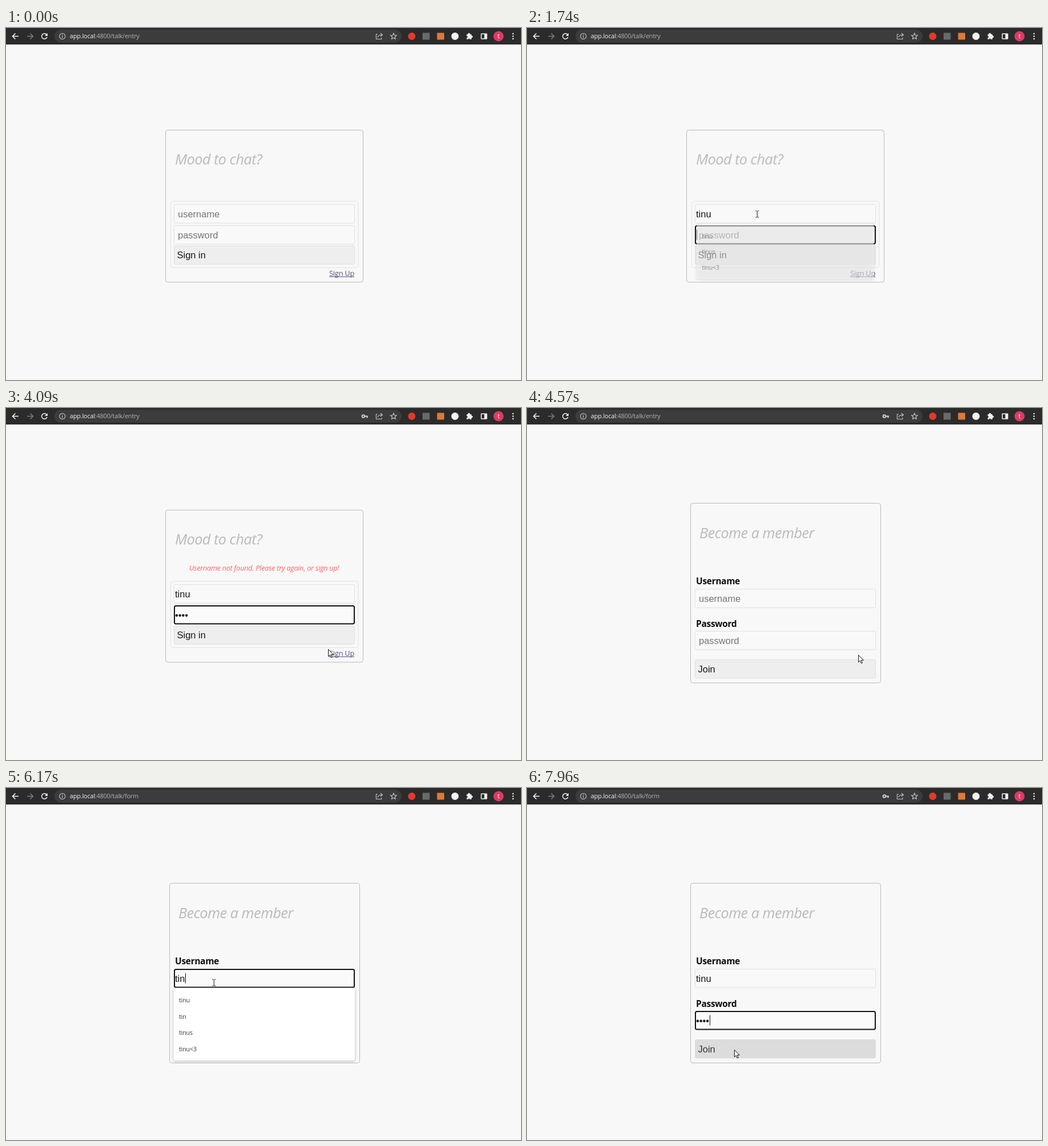
An HTML page with a canvas for the animation above (8 s loop, 905 by 619 pixels).

```html
<!DOCTYPE html>
<html lang="en">
<head>
<meta charset="utf-8">
<title>Sign in and join</title>
<style>
  html, body { margin: 0; width: 100%; height: 100%; overflow: hidden; background: #f8f8f8; }
  canvas { display: block; }
</style>
</head>
<body>
<canvas id="stage" width="905" height="619"></canvas>
<script>
const ctx = document.getElementById('stage').getContext('2d');
const LOOP = 8000;
const BLINK = 530;
const TAU = Math.PI * 2;
const UI = '"Open Sans", "Noto Sans", sans-serif';
const FORM = '"Liberation Sans", Arial, sans-serif';
const NAME = 'tinu';
const SUGGESTIONS = ['tinu', 'tin', 'tinus', 'tinu<3', 'moreb', 'kelso4'];

const PAGES = {
  login: {
    start: 0, card: [280.5, 179.5, 347, 267.5], title: ['Mood to chat?', 297, 240],
    fields: [310.5, 347.5], button: ['Sign in', 383],
    focus: 530, typed: [1270, 1370, 1430, 1470], tab: 1670, dots: [1980, 2060, 2130, 2210]
  },
  join: {
    start: 4360, card: [287.5, 167.5, 334, 316], title: ['Become a member', 303, 229],
    fields: [318.5, 392.5], button: ['Join', 442.5],
    focus: 5120, typed: [5980, 6050, 6170, 6240], tab: 6450, dots: [6610, 6700, 6780, 6860]
  }
};

// Pointer legs: start, end, from, to
const LEGS = [
  [40, 500, 805, 572, 403.5, 327],
  [3790, 4160, 403.5, 327, 582, 434],
  [4660, 5100, 582, 434, 364.5, 342],
  [7510, 7910, 364.5, 342, 364, 460]
];

const clamp = v => Math.max(0, Math.min(1, v));
const progress = (t, from, to) => clamp((t - from) / (to - from));
const ease = p => p * p * (3 - 2 * p);
const countBefore = (times, t) => times.filter(at => at <= t).length;

function text(str, x, y, size, color, { family = UI, style = '', align = 'left' } = {}) {
  ctx.font = `${style} ${size}px ${family}`;
  ctx.letterSpacing = family === UI ? `${-0.019 * size}px` : '0px';
  ctx.textAlign = align;
  ctx.fillStyle = color;
  ctx.fillText(str, x, y);
  return ctx.measureText(str).width;
}

function box(x, y, w, h, r, fill, stroke, line = 1) {
  ctx.beginPath();
  ctx.roundRect(x, y, w, h, r);
  if (fill) { ctx.fillStyle = fill; ctx.fill(); }
  if (stroke) { ctx.strokeStyle = stroke; ctx.lineWidth = line; ctx.stroke(); }
}

function disc(x, y, r, color) {
  ctx.beginPath();
  ctx.arc(x, y, r, 0, TAU);
  ctx.fillStyle = color;
  ctx.fill();
}

function ring(x, y, r, color, line, from = 0, to = TAU) {
  ctx.beginPath();
  ctx.arc(x, y, r, from, to);
  ctx.strokeStyle = color;
  ctx.lineWidth = line;
  ctx.stroke();
}

function stroke(d, color, line) {
  ctx.strokeStyle = color;
  ctx.lineWidth = line;
  ctx.stroke(new Path2D(d));
}

function shape(d, x, y, fill, outline) {
  const path = new Path2D(d);
  ctx.save();
  ctx.translate(x, y);
  ctx.fillStyle = fill;
  ctx.fill(path);
  ctx.strokeStyle = outline;
  ctx.lineWidth = 1;
  ctx.lineJoin = 'round';
  ctx.stroke(path);
  ctx.restore();
}

function drawStar(x, y) {
  ctx.beginPath();
  for (let i = 0; i < 10; i++) {
    const a = -Math.PI / 2 + i * Math.PI / 5;
    const r = i % 2 ? 2.5 : 5.6;
    ctx.lineTo(x + r * Math.cos(a), y + r * Math.sin(a));
  }
  ctx.closePath();
  ctx.strokeStyle = '#d0d0d0';
  ctx.lineWidth = 1.1;
  ctx.stroke();
}

function drawToolbar(t) {
  ctx.fillStyle = '#2b2b2b';
  ctx.fillRect(0, 0, 905, 29);
  box(85, 3, 610, 22.5, 11, '#3c3c3c');

  stroke('M22 14.5H11.5M16.5 9.5L11.5 14.5L16.5 19.5', '#f2f2f2', 1.6);
  stroke('M37 14.5H47.5M42.5 9.5L47.5 14.5L42.5 19.5', '#7d7d7d', 1.5);
  ring(67.5, 14.5, 4.7, '#f2f2f2', 1.6, 0.3, TAU - 0.7);
  ctx.fillStyle = '#f2f2f2';
  ctx.fill(new Path2D('M73 9V14H68Z'));

  ring(99, 14.5, 5, '#c8c8c8', 1.1);
  stroke('M99 13.5V17.5M99 11.3V12.5', '#c8c8c8', 1.2);
  const hostWidth = text('app.local', 112, 18, 11, '#f4f4f4');
  text(':4800/talk/' + (t < 4640 ? 'entry' : 'form'), 112 + hostWidth, 18, 11, '#b2b2b2');

  const keyShown = (t >= 1980 && t < 5980) || t >= 6610;
  if (keyShown) {
    ring(628, 14.5, 2.3, '#d0d0d0', 2);
    stroke('M630.5 14.5H636M634.5 14.5V17.5', '#d0d0d0', 2);
  }
  stroke('M653 11H650.5V19.5H660V17M653 16.5C653.5 13 656 12 661 12M658 9L661.5 12L658 15', '#c4c4c4', 1.1);
  drawStar(681, 14.8);

  disc(713, 14.5, 6.5, '#e23a2e');
  box(732, 8.5, 12.5, 12, 0, '#6a6a6a');
  box(757.5, 8.5, 12.5, 12, 1, '#dc7a3a');
  disc(789, 14.5, 6.5, '#f4f4f4');

  box(809.5, 11, 8.5, 9, 1, '#f2f2f2');
  disc(813.5, 10.7, 1.9, '#f2f2f2');
  disc(818.3, 15.3, 1.9, '#f2f2f2');
  disc(809.7, 15.6, 1.5, '#2b2b2b');
  disc(813.6, 20, 1.5, '#2b2b2b');

  box(835.2, 10.2, 9.6, 8.8, 0.5, null, '#f2f2f2', 1.5);
  ctx.fillStyle = '#f2f2f2';
  ctx.fillRect(840.5, 10, 4.5, 9);
  disc(865.5, 14.5, 9, '#dc3b66');
  text('t', 865.5, 18, 10.5, '#fff', { align: 'center' });
  for (const y of [10, 14.5, 19]) disc(891, y, 1.3, '#f2f2f2');
}

function pointerAt(t) {
  if (t < 70) return null;
  let leg = LEGS[0];
  for (const next of LEGS) if (t >= next[0]) leg = next;
  const [from, to, x0, y0, x1, y1] = leg;
  const p = ease(progress(t, from, to));
  return { x: x0 + (x1 - x0) * p, y: y0 + (y1 - y0) * p };
}

const inside = (p, x, y, w, h) => p && p.x >= x && p.x <= x + w && p.y >= y && p.y <= y + h;

function drawField(y, focused, value, hint, caretOn) {
  if (focused) box(296, y + 0.5, 316, 31.5, 2.5, '#fafafa', '#111', 2);
  else box(295.5, y, 317, 32.5, 2, '#f9f9f9', '#e0e0e0');
  const base = y + 22;
  let width = 0;
  if (value) width = text(value, 297, base, 16.5, '#15151c', { family: FORM });
  else text(hint, 302, base, 16.5, '#757575', { family: FORM });
  if (focused && caretOn) {
    ctx.fillStyle = '#111';
    ctx.fillRect(298 + Math.round(width), y + 7, 1, 18);
  }
}

function drawButton([label, y], hovered) {
  box(295.5, y, 317, 32.5, 2, hovered ? '#dcdcdc' : '#eee', hovered ? '#dcdcdc' : '#e0e0e0');
  text(label, 300.5, y + 22, 16.5, hovered ? '#333' : '#16161c', { family: FORM });
}

function drawSuggestions(top, query, t, page) {
  const closing = progress(t, page.tab, page.tab + 150);
  const alpha = Math.min(progress(t, page.focus + 20, page.focus + 130), 1 - closing);
  if (alpha <= 0) return;
  const items = SUGGESTIONS.filter(s => s.startsWith(query));
  const height = 13.5 + 28.6 * items.length;
  const midY = top + height / 2;
  const scale = 1 - 0.05 * closing;
  ctx.save();
  ctx.globalAlpha = alpha;
  ctx.translate(453.5, midY);
  ctx.scale(scale, scale);
  ctx.translate(-453.5, -midY);
  ctx.shadowColor = 'rgba(0,0,0,.28)';
  ctx.shadowBlur = 4;
  ctx.shadowOffsetY = 1;
  box(294.5, top, 318.5, height, 3, '#fff');
  ctx.shadowColor = 'transparent';
  items.forEach((item, i) => text(item, 304, top + 25.5 + 28.6 * i, 10.8, '#3a3a46'));
  ctx.restore();
}

function drawPage(t, page, pointer) {
  const isLogin = page === PAGES.login;
  const [nameY, passY] = page.fields;
  const query = NAME.slice(0, countBefore(page.typed, t));
  const dots = '•'.repeat(countBefore(page.dots, t));
  const events = [page.focus, ...page.typed, page.tab, ...page.dots];
  const lastEvent = Math.max(...events.filter(at => at <= t), page.start);
  const caretOn = Math.floor((t - lastEvent) / BLINK) % 2 === 0;

  box(...page.card, 4, null, '#b6b9bb');
  const [title, titleX, titleY] = page.title;
  text(title, titleX, titleY, 25.3, '#b9bbb9', { style: 'italic' });

  if (isLogin) {
    box(289.5, 304.5, 329.5, 117, 5, null, '#e2e2e2');
    ctx.globalAlpha = progress(t, 2980, 3300);
    text('Username not found. Please try again, or sign up!', 453.5, 286, 12.7, '#ff6464',
      { style: 'italic', align: 'center' });
    ctx.globalAlpha = 1;
    text('Sign Up', 612, 436, 12.8, '#57507f', { align: 'right' });
    ctx.fillRect(568, 437, 44, 1);
  } else {
    text('Username', 297, 309.5, 15.5, '#0c0c0c', { style: 'bold' });
    text('Password', 297, 384.5, 15.5, '#0c0c0c', { style: 'bold' });
  }

  drawField(nameY, t >= page.focus && t < page.tab, query, 'username', caretOn);
  drawField(passY, t >= page.tab, dots, 'password', caretOn);
  drawButton(page.button, inside(pointer, 295, page.button[1], 318, 33));
  drawSuggestions(nameY + 33, query, t, page);
}

function drawPointer(p, page) {
  if (!p) return;
  const x = Math.round(p.x), y = Math.round(p.y);
  const overField = page.fields.some(top => inside(p, 295, top, 318, 33));
  const overLink = page === PAGES.login && inside(p, 568, 424, 45, 15);
  if (overField) {
    ctx.save();
    ctx.translate(x + 0.5, y);
    stroke('M-3 -5.5H-1L0 -4.5L1 -5.5H3M0 -5V5.5M-3 6H-1L0 5L1 6H3', '#222', 1);
    ctx.restore();
  } else if (overLink) {
    shape('M-1.5 1Q0 -1 1.5 1V6L3 6Q4 5.5 5 6.5Q6.5 6 7 7.2Q9 7 9 9V13L7.5 17H0L-4.5 11Q-4.5 8.5 -1.5 10Z',
      x, y, '#fff', '#111');
  } else {
    shape('M0 0V12.5L2.9 9.8L4.9 14.5L6.9 13.6L4.9 9.1H8.8Z', x + 0.5, y + 0.5, '#fff', '#111');
  }
}

function render(t) {
  const page = t < PAGES.join.start ? PAGES.login : PAGES.join;
  const pointer = pointerAt(t);
  ctx.fillStyle = '#f8f8f8';
  ctx.fillRect(0, 0, 905, 619);
  drawToolbar(t);
  drawPage(t, page, pointer);
  drawPointer(pointer, page);
}

const started = performance.now();
function tick() {
  render((performance.now() - started) % LOOP);
  requestAnimationFrame(tick);
}
tick();
</script>
</body>
</html>
```
